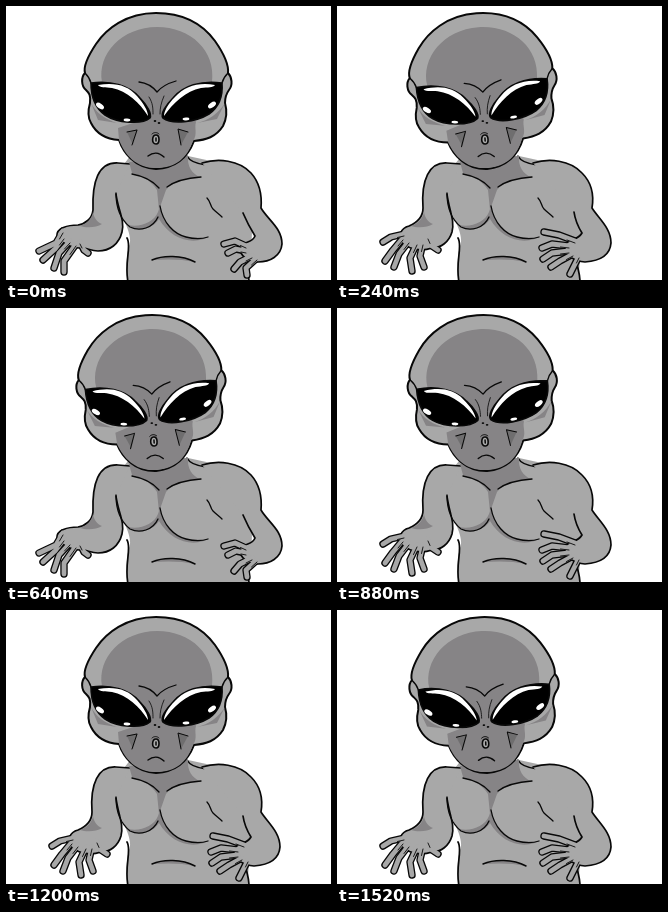
Recreate the animation shown at these times as an HTML page with a canvas. Size 325x274 px, loop 1.6 s.

```html
<!DOCTYPE html>
<html>
<head>
<meta charset="utf-8">
<style>
  html, body { margin: 0; width: 100%; height: 100%; overflow: hidden; background: #fff; }
  canvas { display: block; }
</style>
</head>
<body>
<canvas id="stage" width="325" height="274"></canvas>
<script>
const ctx = document.getElementById('stage').getContext('2d');
const SKIN = '#a8a8a8', SHADE = '#868486', INK = '#080808';
const STEP = 80;

// Head tilt about the chin, and the order in which the arm poses swing
const TILTS = [0, -3.7, -4, -3.9, -2.5];
const SWING = [0, 1, 2, 1];

const POSES = [
  {
    left: 'M110,188C112,204 119,214 116,226C113,238 104,245 92,245C84,245 80,241 74,242C64,242 54,236 51,230C50,222 62,219 72,219C79,218 86,213 87,204C86,176 92,156 112,157L124,158',
    leftFingers: ['M57,225L50,237L33,245', 'M58,231L49,243L37,254', 'M64,235L53,247L48,262', 'M70,238L58,255L58,266', 'M74,236L78,244L82,247'],
    right: 'M196,157C212,152 233,154 245,167C254,177 256,190 255,202C262,214 276,222 276,238C275,250 264,256 252,256C242,256 234,250 234,242C238,234 246,238 249,230C244,222 240,214 237,207',
    rightFingers: ['M240,240L229,235L218,238', 'M240,245L230,243L222,247', 'M246,250L234,256L228,263', 'M251,252L240,262L241,269']
  },
  {
    left: 'M110,188C112,204 118,214 115,226C112,236 104,242 95,242C84,246 73,243 66,238C60,230 64,222 72,220C79,217 86,212 86,202C84,174 92,156 110,157L124,158',
    leftFingers: ['M67,228L54,231L46,236', 'M66,232L56,244L48,255', 'M72,235L62,248L57,261', 'M80,237L73,252L75,265', 'M86,237L83,250L87,261', 'M91,231L95,240L101,244'],
    right: 'M196,157C212,152 233,154 245,167C255,177 257,190 255,202C262,213 274,222 274,237C273,250 262,255 248,256C238,255 228,250 228,242C228,232 240,236 245,227C240,219 238,213 237,206',
    rightFingers: ['M238,235L222,229L207,226', 'M232,240L215,238L205,242', 'M232,245L215,247L206,253', 'M236,248L223,255L214,261', 'M242,250L237,260L233,268']
  },
  {
    left: 'M110,188C112,204 120,214 118,226C115,234 104,242 94,244C86,246 77,242 76,234C74,227 80,224 84,218C87,212 86,206 86,200C84,174 92,156 110,157L124,158',
    leftFingers: ['M80,234L68,236L60,239', 'M82,239L69,243L63,250', 'M87,240L80,249L80,257', 'M94,239L92,249L98,258', 'M101,234L110,239L120,237'],
    right: 'M196,157C212,152 233,154 244,167C253,177 254,190 252,202C258,212 271,220 271,235C271,248 260,253 248,252C238,252 228,246 228,238C230,229 238,231 243,225C240,217 237,212 237,206',
    rightFingers: ['M236,232L217,227L204,230', 'M232,236L215,235L204,237', 'M232,241L217,243L207,249', 'M236,246L226,251L218,256', 'M243,246L239,253L236,260']
  }
];

function shape(d, fill, width = 0, color = INK) {
  const path = new Path2D(d);
  if (fill) { ctx.fillStyle = fill; ctx.fill(path); }
  if (width) { ctx.lineWidth = width; ctx.strokeStyle = color; ctx.stroke(path); }
}

const line = (d, width = 1.3) => shape(d, null, width);

function dot(x, y, rx, ry, color, turn = 0) {
  ctx.beginPath();
  ctx.ellipse(x, y, rx, ry, turn, 0, 7);
  ctx.fillStyle = color;
  ctx.fill();
}

function arm(outline, fingers) {
  fingers.forEach(d => line(d, 7.4));
  shape(outline, SKIN, 1.7);
  fingers.forEach(d => shape(d, null, 4.8, SKIN));
  // Creases where neighbouring fingers leave the palm
  fingers.forEach(d => {
    const [x, y, u, v] = d.match(/\d+/g).map(Number);
    line(`M${x},${y + 2}L${(x + u) / 2},${(y + v) / 2 + 2}`, 0.9);
  });
}

function torso() {
  shape('M124,150C116,162 105,170 109,190C113,210 125,222 124,236C121,246 119,260 122,276L243,276C240,262 246,245 246,225L240,195L205,155L182,150Z', SKIN);
  line('M121,232C126,240 118,256 122,276', 1.7);
  line('M243,276C243,268 241,264 240,258', 1.7);
  line('M181,150C184,156 192,158 200,159', 1.5);
}

function chest() {
  shape('M123,156L182,150C181,160 186,168 194,171C178,172 166,176 160,184L153,204L151,184C146,176 138,170 126,167Z', SHADE);
  shape('M87,206C88,212 91,216 96,218C90,222 80,222 74,220C82,217 86,212 87,206Z', SHADE);
  shape('M154,200C156,214 166,228 180,231L200,232C184,239 164,232 153,213C146,224 130,226 122,219C134,222 148,216 152,206Z', SHADE);
  shape('M147,254C158,249 176,249 189,256C176,253 160,253 147,254Z', SHADE);
  line('M110,187C110,202 114,213 124,221C134,226 147,222 152,211');
  line('M154,200C157,217 168,228 180,231C188,233 196,233 202,231');
  line('M126,168C137,170 147,175 153,182');
  line('M195,171C181,172 169,175 161,181');
  line('M201,192C205,196 204,200 207,203C210,206 213,208 216,211');
  line('M146,254C157,249 176,249 189,256', 1.5);
}

function eyes() {
  shape('M85,77C105,74 124,80 134,92C141,99 146,108 144,112C136,119 111,117 99,109C89,102 85,90 85,77Z', '#000', 1.6);
  shape('M216,77C195,74 177,80 167,92C160,99 154,108 157,112C166,119 190,116 203,108C213,101 217,90 216,77Z', '#000', 1.6);
  shape('M92,79C108,76 122,79 131,90C138,98 142,105 142,110C134,97 121,85 106,82C99,81 94,82 92,79Z', '#fff');
  shape('M209,79C193,76 179,80 169,91C162,98 158,105 158,110C167,97 180,85 195,82C202,81 207,82 209,79Z', '#fff');
  dot(94, 100, 4.5, 2.4, '#fff', 0.6);
  dot(121, 114, 3.4, 1.4, '#fff', 0.1);
  dot(206, 99, 4.5, 2.4, '#fff', -0.6);
  dot(180, 113, 3.4, 1.4, '#fff', -0.1);
}

function head(tilt) {
  ctx.save();
  ctx.translate(150, 162);
  ctx.rotate(tilt * Math.PI / 180);
  ctx.translate(-150, -162);
  shape('M150,7C120,7 100,23 90,38C82,50 77,60 79,67C75,71 75,80 80,84C83,87 85,89 84,97C82,104 82,112 85,117C90,127 98,133 113,134C117,146 128,162 150,163C170,162 182,151 188,135C200,134 210,131 217,120C221,112 221,104 219,97C219,91 220,88 223,84C227,79 226,71 222,67C223,58 216,45 209,35C198,20 180,7 150,7Z', SKIN, 2);
  shape('M96,76C91,48 116,21 151,21C185,21 210,45 206,76L180,92L190,116C188,122 192,128 187,135C181,152 170,162 150,162C130,162 119,149 113,134L112,122L136,114L122,92Z', SHADE);
  shape('M85,97C90,107 99,113 111,117L92,114Z', SHADE);
  shape('M219,97C212,108 203,114 191,117L211,113Z', SHADE);
  eyes();
  line('M79,67C82,70 84,73 85,77M222,67C219,70 217,73 216,77', 1.4);
  line('M133,76C141,77 147,81 151,86C156,80 163,77 170,75');
  line('M143,91C147,97 147,103 147,108M158,90C155,97 154,102 154,108', 0.8);
  dot(149, 115, 1.3, 0.9, INK);
  dot(153, 117, 1.3, 0.9, INK);
  shape('M121,126L132,123L127,139Z', '#6f6e6f');
  shape('M172,123L182,126L175,139Z', '#6f6e6f');
  line('M121,126L131,124L126,139M182,126L172,123L175,139', 1);
  line('M146,128C148,126 151,126 153,128', 0.9);
  shape('M150,129C154,129 154,138 150,138C145,138 146,129 150,129Z', '#aaa', 1.6);
  line('M150,132L150,135', 1.5);
  line('M142,150C147,146 153,146 158,151', 1.4);
  ctx.restore();
}

function draw(now) {
  const step = Math.floor(now / STEP);
  const pose = POSES[SWING[step % SWING.length]];
  ctx.fillStyle = '#fff';
  ctx.fillRect(0, 0, 325, 274);
  ctx.lineCap = ctx.lineJoin = 'round';
  torso();
  arm(pose.left, pose.leftFingers);
  arm(pose.right, pose.rightFingers);
  chest();
  head(TILTS[step % TILTS.length]);
  requestAnimationFrame(draw);
}

requestAnimationFrame(draw);
</script>
</body>
</html>
```
